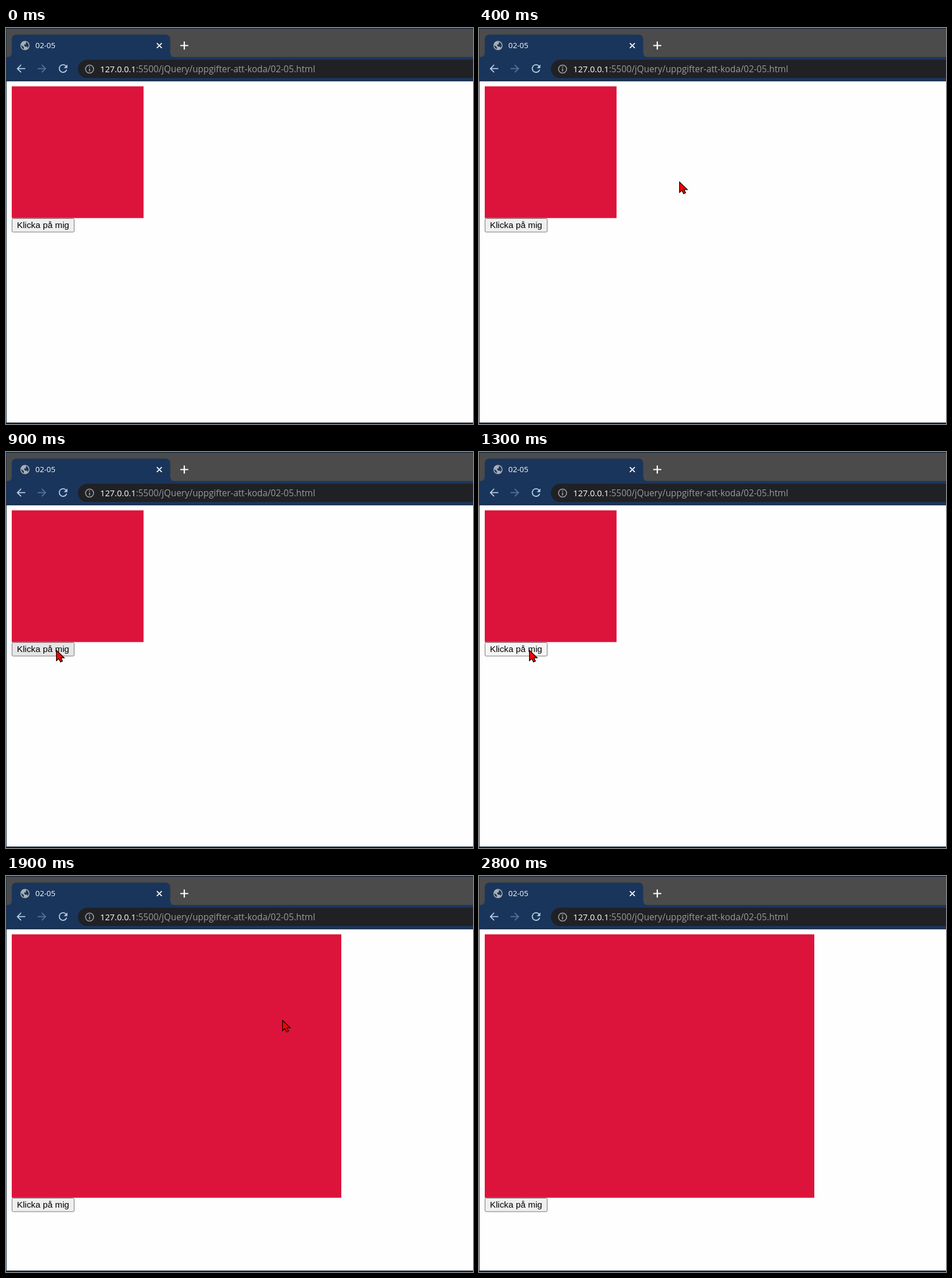
An HTML page that plays this animation: 812x689 px, repeating every 2.9 s.

```html
<!DOCTYPE html>
<html lang="sv">
<head>
<meta charset="utf-8">
<title>02-05</title>
<style>
  html, body { margin: 0; width: 100%; height: 100%; overflow: hidden; background: #fefefe; }
  svg { display: block; width: 812px; height: 689px; }
  .ui { font-family: "Open Sans", "Noto Sans", sans-serif; }
  .label { font: 15.28px "Liberation Sans", Arial, sans-serif; }
  .line { fill: none; stroke-width: 1.8; }
</style>
</head>
<body>
<svg viewBox="0 0 812 689">
  <rect width="812" height="689" fill="#fefefe"/>

  <!-- Tab strip and toolbar -->
  <rect width="812" height="51" fill="#4b4b4b"/>
  <rect y="50.5" width="812" height="42" fill="#1a355b"/>
  <path fill="#1a355b" d="M1 51Q10 51 10 42V20Q10 11.5 18.5 11.5H277Q285.500 11.5 285.500 20V42Q285.500 51 294.500 51Z"/>
  <rect y="91" width="812" height="1.500" fill="#122744"/>
  <rect width="812" height="1.200" fill="#0b2138"/>

  <!-- Globe -->
  <circle cx="33" cy="30.500" r="8" fill="#a9adb3"/>
  <path fill="#1a355b" d="M26.500 29.500L31 33.500V36.800Q27 35.800 26.500 29.500ZM35 24.300Q39 26 39.500 30.500L38 34.500 36.500 32.500H33.500L31.500 30.500 32 28.500H34.500V26.500Z"/>

  <text class="ui" x="51" y="35.300" font-size="13.4" fill="#fff">02-05</text>
  <path class="line" stroke="#fff" d="M262.300 26.300l8.600 8.600m0-8.600l-8.600 8.600"/>
  <path class="line" stroke="#fff" style="stroke-width:2.2" d="M303 30.500h14m-7-7v14"/>

  <!-- Navigation -->
  <path class="line" stroke="#b9cce6" d="M33.500 70.700H20m6.300-6.500L19.800 70.700l6.500 6.500"/>
  <path class="line" stroke="#5b7395" d="M55 70.700H68.500m-6.300-6.500l6.500 6.500-6.500 6.500"/>
  <path class="line" stroke="#b9cce6" d="M104.300 66.300A6.600 6.600 0 1 0 105.500 72.500"/>
  <path fill="#b9cce6" d="M106.700 63.500V69.700H100.500Z"/>

  <!-- Address field -->
  <path id="field" d="M812 55.300H141A15.900 15.900 0 0 0 141 87.100H812Z"/>
  <circle class="line" cx="145.300" cy="71.500" r="7" stroke="#a0a3a7" style="stroke-width:1.6"/>
  <path class="line" stroke="#a0a3a7" d="M145.300 70.500v5m0-8.500v1.800"/>
  <text class="ui" x="163.800" y="77" font-size="14.7" fill="#fff">127.0.0.1</text>
  <text class="ui" x="226" y="77" font-size="15.37" fill="#989a9d">:5500/jQuery/uppgifter-att-koda/02-05.html</text>

  <!-- Page -->
  <rect id="box" x="10" y="101.500" fill="#dc143c"/>
  <g id="button">
    <rect id="face" x="10.500" y=".5" width="108" height="23.500" rx="2" stroke="#767676"/>
    <text class="label" x="19" y="17.300" fill="#000">Klicka på mig</text>
  </g>

  <!-- Window edges -->
  <rect y="1" width="1" height="688" fill="#1d3347"/>
  <rect y="686.500" width="812" height="2.500" fill="#0d1c2e"/>

  <path id="cursor" fill="#f00" stroke="#100" stroke-width="1.300"
    d="M.7 1V19L4.800 15.500 7.800 21.300 11.200 19.600 8.500 14.200H14.200Z"/>
</svg>
<script>
  const LOOP = 2900;
  const $ = id => document.getElementById(id);
  const [field, box, button, face, cursor] =
    ["field", "box", "button", "face", "cursor"].map($);

  // Pointer samples: time, x, y (no position means it is outside the window)
  const pointer = [
    [0], [200, 787, 70], [300, 591, 205], [400, 348, 267], [500, 190, 316],
    [600, 112, 346], [700, 89, 352], [900, 87, 344],
    [1800, 190, 324], [1900, 480, 250], [2000, 711, 172],
    [2100, 757, 116], [2200, 795, 61], [2300]
  ];

  const during = (t, from, to) => t >= from && t < to;

  function draw(t) {
    const [, x, y] = pointer.findLast(p => p[0] <= t);
    cursor.style.display = x === undefined ? "none" : "";
    if (x !== undefined) cursor.setAttribute("transform", `translate(${x} ${y})`);

    const grown = t >= 1400;
    const height = grown ? 458.300 : 229.200;
    box.setAttribute("width", grown ? 573 : 229.200);
    box.setAttribute("height", height);
    button.setAttribute("transform", `translate(0 ${Math.round(101.500 + height)})`);

    const hovered = during(t, 600, 1300);
    const pressed = during(t, 1300, 1400);
    face.setAttribute("fill", pressed ? "#f5f5f5" : hovered ? "#e5e5e5" : "#efefef");
    field.setAttribute("fill", during(t, 2200, 2800) ? "#282a2d" : "#202124");
  }

  const start = performance.now();
  function tick() {
    draw((performance.now() - start) % LOOP);
    requestAnimationFrame(tick);
  }
  tick();
</script>
</body>
</html>
```
